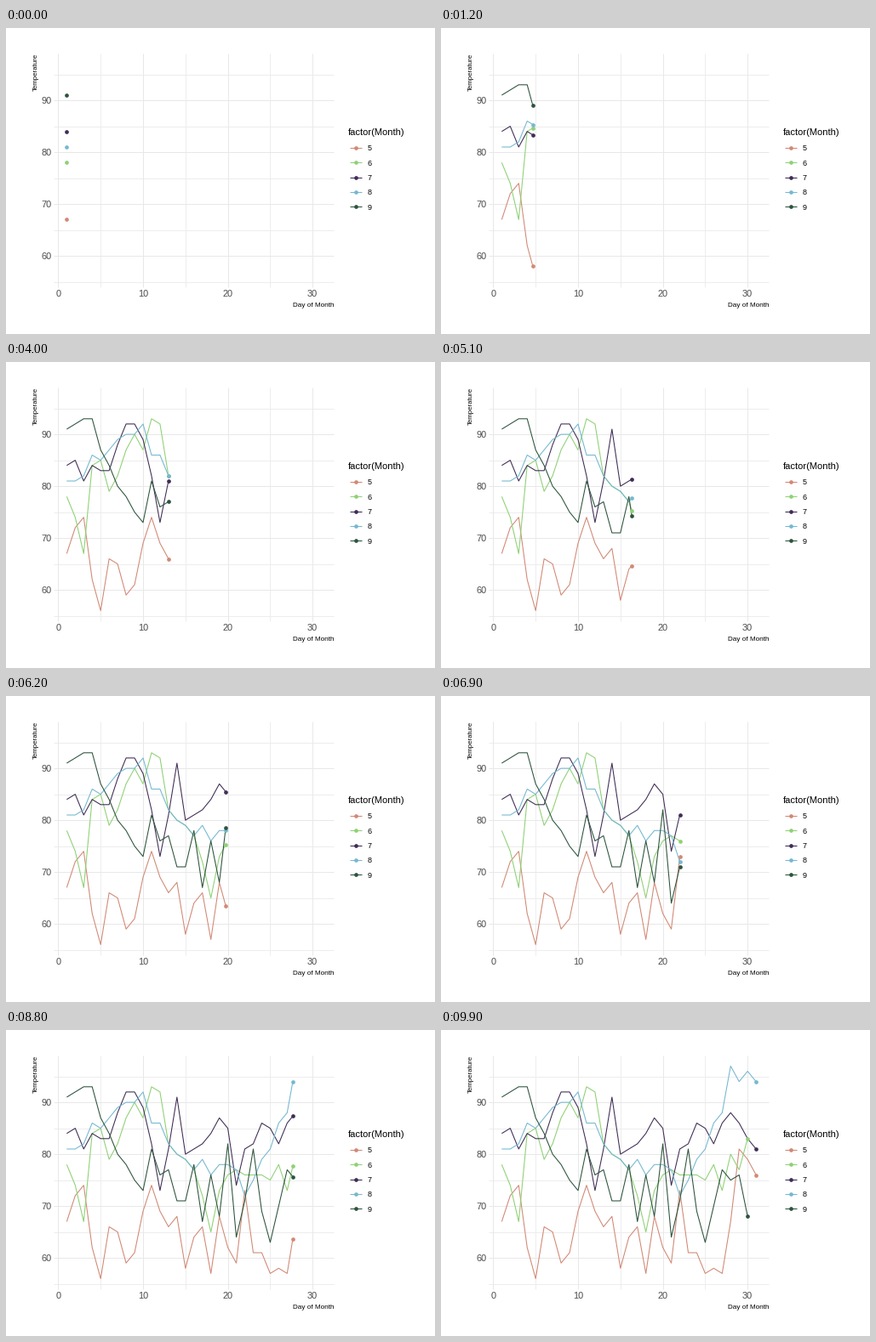
A matplotlib script for the animation above (10 s loop, 504 by 360 pixels).

```python
import numpy as np
import matplotlib.pyplot as plt
from matplotlib.animation import FuncAnimation

W, H, DPI = 504, 360, 72
FRAMES, INTERVAL = 100, 100

plt.rcParams["font.family"] = "Liberation Sans"

# Daily temperatures, one list per month
may = [67, 72, 74, 62, 56, 66, 65, 59, 61, 69, 74, 69, 66, 68, 58, 64,
       66, 57, 68, 62, 59, 73, 61, 61, 57, 58, 57, 67, 81, 79, 76]
june = [78, 74, 67, 84, 85, 79, 82, 87, 90, 87, 93, 92, 82, 80, 79, 77,
        72, 65, 73, 76, 77, 76, 76, 76, 75, 78, 73, 80, 77, 83]
july = [84, 85, 81, 84, 83, 83, 88, 92, 92, 89, 82, 73, 81, 91, 80, 81,
        82, 84, 87, 85, 74, 81, 82, 86, 85, 82, 86, 88, 86, 83, 81]
august = [81, 81, 82, 86, 85, 87, 89, 90, 90, 92, 86, 86, 82, 80, 79, 77,
          79, 76, 78, 78, 77, 72, 75, 79, 81, 86, 88, 97, 94, 96, 94]
september = [91, 92, 93, 93, 87, 84, 80, 78, 75, 73, 81, 76, 77, 71, 71, 78,
             67, 76, 68, 82, 64, 71, 81, 69, 63, 70, 77, 75, 76, 68]

months = [may, june, july, august, september]
colors = ["#d18975", "#8fd175", "#3f2d54", "#75b8d1", "#2d543d"]

# Each day lands on a whole frame; motion between days is linear
days = np.arange(1, 32)
day_frames = np.round((FRAMES - 1) * (days - 1) / 30)


def px(day):
    return 61.4 + 9.96 * np.asarray(day)


def py(temp):
    return 268.1 - 6.1 * (np.asarray(temp) - 60)


fig = plt.figure(figsize=(W / DPI, H / DPI), dpi=DPI, facecolor="white")
ax = fig.add_axes([0, 0, 1, 1])
ax.set_xlim(0, W)
ax.set_ylim(H, 0)
ax.axis("off")


def label(x, y, text, size, color="black", ha="left", **kw):
    ax.text(x, y, text, fontsize=size, color=color, ha=ha, va="baseline", **kw)


def draw_grid():
    left, right = px([-0.5, 32.5])
    bottom, top = py([53.95, 99.05])
    style = dict(lw=1, solid_capstyle="butt", snap=True)
    for step, color in ((5, "#ededed"), (10, "#e8e8e8")):
        for t in range(60 if step == 10 else 55, 100, 10):
            ax.plot([left, right], [py(t)] * 2, color=color, zorder=step / 10, **style)
        for d in range(0 if step == 10 else 5, 32, 10):
            ax.plot([px(d)] * 2, [bottom, top], color=color, zorder=step / 10, **style)


def draw_labels():
    for t in (60, 70, 80, 90):
        label(54, py(t) + 4.1, str(t), 11, "#4d4d4d", "right")
    for d in (0, 10, 20, 30):
        label(px(d), 316.3, str(d), 11, "#4d4d4d", "center")
    label(385.2, 328, "Day of Month", 8.1, ha="right")
    label(37.3, 29.8, "Temperature", 7.9, ha="right",
          rotation=90, rotation_mode="anchor")


def make_pair(color):
    line, = ax.plot([], [], color=color, lw=1.07, solid_capstyle="butt",
                    solid_joinstyle="round", zorder=3)
    dot, = ax.plot([], [], "o", color=color, ms=4.7, mew=0, zorder=4)
    return line, dot


def draw_legend():
    label(402, 126.2, "factor(Month)", 11.1)
    for i, color in enumerate(colors):
        y = 141 + 17.28 * i
        line, dot = make_pair(color)
        line.set_data([404.1, 417.9], [y, y])
        dot.set_data([411], [y])
        label(424.9, y + 3.4, str(5 + i), 9)


draw_grid()
draw_labels()
draw_legend()
series = [(temps, *make_pair(c)) for temps, c in zip(months, colors)]


def update(frame):
    now = np.interp(frame, day_frames, days)
    artists = []
    for temps, line, dot in series:
        own = days[:len(temps)]
        tip = min(now, len(temps))
        xs = np.append(own[own < tip], tip)
        ys = np.interp(xs, own, temps)
        line.set_data(px(xs), py(ys))
        dot.set_data(px(xs[-1:]), py(ys[-1:]))
        artists += [line, dot]
    return artists


anim = FuncAnimation(fig, update, frames=FRAMES, interval=INTERVAL,
                     repeat=True, repeat_delay=0, blit=False)
plt.show()
```
